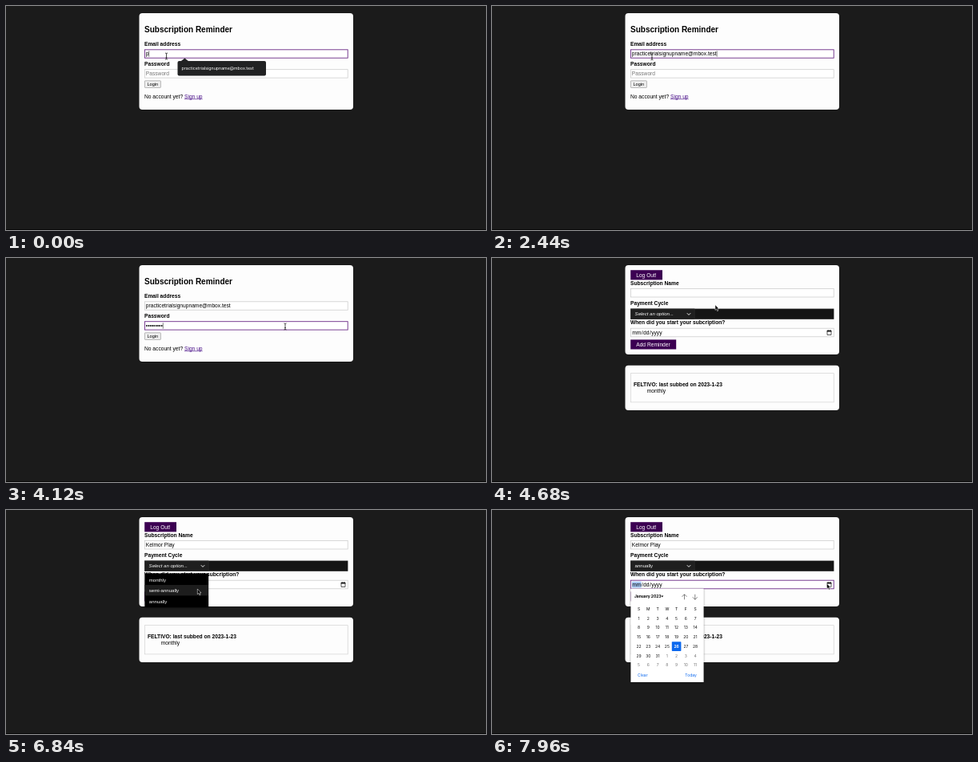
An HTML page that plays this animation: 600x281 px, repeating every 8 s.

```html
<!DOCTYPE html>
<html lang="en">
<head>
<meta charset="utf-8">
<title>Subscription Reminder</title>
<style>
  html, body { margin: 0; width: 100%; height: 100%; overflow: hidden; background: #1b1b1b; }
  svg { display: block; width: 100%; height: 100%; }
  text { font-family: "Liberation Sans", Arial, sans-serif; font-size: 6.67px; white-space: pre; }
  .b { font-weight: bold; }
  .ui { font-family: Inter, Roboto, sans-serif; }
  .opt { font-size: 6.05px; fill: #fff; }
  .cal { font-size: 5px; text-anchor: middle; }
</style>
</head>
<body>
<svg id="stage" viewBox="0 0 600 281"></svg>
<script>
const LOOP = 8000;
const EMAIL = 'practicetrialsignupname@mbox.test';
const USER_LEN = EMAIL.indexOf('@');
const SERVICE = 'Kelmor Play';
const PURPLE = '#3c0052';

const rect = (x, y, w, h, fill, more = '') =>
  `<rect x="${x}" y="${y}" width="${w}" height="${h}" fill="${fill}" ${more}/>`;
const text = (x, y, s, more = '') => `<text x="${x}" y="${y}" ${more}>${s}</text>`;
const bold = (x, y, s) => text(x, y, s, 'class="b"');
const path = (d, stroke, w = .8, fill = 'none') =>
  `<path d="${d}" fill="${fill}" stroke="${stroke}" stroke-width="${w}"/>`;
const group = (id, body, more = '') => `<g id="${id}" ${more}>${body}</g>`;
const card = (y, h) => rect(166.5, y, 267.5, h, '#fdfdfd', 'rx="4"');
const field = (id, y, h = 10.4) =>
  rect(173.4, y, 253.8, h, '#fff', `id="${id}" stroke="#c8c8c8" stroke-width=".7"`);
const button = (x, y, w, h, label) =>
  rect(x, y, w, h, PURPLE) + text(x + 7, y + 8.5, label, 'fill="#fff"');

const login = () =>
  card(9, 121) +
  text(173, 33, 'Subscription Reminder', 'class="b" style="font-size:10px"') +
  bold(173, 50, 'Email address') + field('emailBox', 54.8) + text(174.8, 62.3, '', 'id="email"') +
  bold(173, 74.9, 'Password') + field('passBox', 79.7) + text(174.8, 87.3, '', 'id="pass"') +
  rect(173.4, 93.8, 20, 8.6, '#efefef', 'stroke="#767676" stroke-width=".5" rx=".6"') +
  text(176.5, 100, 'Login', 'style="font-size:5.56px"') +
  text(173, 115.5, 'No account yet?') +
  text(223, 115.5, 'Sign up', 'fill="#4b128a" text-decoration="underline"') +
  group('popup',
    path('M218.3 69.5L223.4 65.5L228.5 69.5Z', 'none', 0, '#212223') +
    rect(214.5, 69, 110.5, 18.5, '#212223', 'rx="2"') +
    text(219.5, 80.1, EMAIL, 'class="ui" fill="#fff" style="font-size:5.3px"'));

const dateField = () =>
  field('dateBox', 88.2, 10.6) +
  rect(175, 89.7, 11.6, 7.8, '#a9caf8', 'id="dateMark"') +
  [[175.2, 'mm'], [186.8, '/'], [189.1, 'dd'], [197, '/'], [199.2, 'yyyy']]
    .map(([x, s]) => text(x, 95.8, s)).join('') +
  path('M419 91.2H424V96.4H419Z M420.2 90V91.2 M422.8 90V91.2', '#111', .7) +
  rect(418.8, 91, 5.4, 1.5, '#111');

const menu = () =>
  rect(173.5, 79.6, 79.5, 42.6, '#000', 'filter="url(#shade)"') +
  rect(173.5, 0, 79.5, 13.4, '#1d1d1d', 'id="hover"') +
  ['monthly', 'semi-annually', 'annually']
    .map((s, i) => text(178.8, 89.8 + i * 13.35, s, 'class="opt"')).join('');

function calendar() {
  const colX = c => 183.6 + c * 11.75;
  let out = rect(173.5, 98.6, 91, 117.4, '#fff', 'filter="url(#shade)"') +
    text(178, 110.2, 'January 2023', 'class="ui b" style="font-size:4.9px"') +
    path('M211.2 107.5H214.4L212.8 109.5Z', 'none', 0, '#111') +
    path('M240.5 112.3V105.8 M237.5 108.8L240.5 105.8L243.5 108.8', '#333', .6) +
    path('M253.8 105.8V112.3 M250.8 109.3L253.8 112.3L256.8 109.3', '#333', .6);
  [...'SMTWTFS'].forEach((s, c) => out += text(colX(c), 125.8, s, 'class="ui cal"'));
  for (let i = 0; i < 42; i++) {
    const x = colX(i % 7), y = 137.7 + Math.floor(i / 7) * 11.75;
    const today = i === 25;
    if (today) out += rect(x - 5.8, y - 7.7, 11.6, 11.7, '#0b68ee', 'rx=".6"');
    const fill = today ? '#fff' : i > 30 ? '#777' : '#111';
    out += text(x, y, i % 31 + 1, `class="ui cal${today ? ' b' : ''}" fill="${fill}"`);
  }
  return out + text(188.3, 209.4, 'Clear', 'class="ui cal" fill="#0b68ee"') +
    text(248.6, 209.4, 'Today', 'class="ui cal" fill="#0b68ee"');
}

const reminders = () =>
  card(9, 112) +
  button(173.2, 15.2, 39.8, 12.2, 'Log Out!') +
  bold(173, 33.5, 'Subscription Name') + field('nameBox', 38.6) + text(174.8, 46.2, '', 'id="name"') +
  bold(173, 58.8, 'Payment Cycle') +
  rect(173.2, 63.6, 254.2, 13.2, '#151515') +
  rect(173.5, 63.9, 79.6, 12.6, '#1f1f1f', 'stroke="#383838" stroke-width=".5"') +
  text(178.6, 72.3, '', 'id="cycle" class="opt"') +
  path('M243.8 69.2L246 71.4L248.2 69.2', '#fff', .9) +
  bold(173, 83.3, 'When did you start your subcription?') +
  dateField() +
  button(173.2, 102.4, 57, 12.1, 'Add Reminder') +
  card(134.7, 56.2) +
  rect(173.4, 144.7, 253.8, 36.2, '#fdfdfd', 'stroke="#ccc" stroke-width=".6"') +
  bold(177, 161.2, 'FELTIVO: last subbed on 2023-1-23') +
  text(193.8, 169, 'monthly') +
  group('menu', menu()) + group('calendar', calendar());

const pointer = () =>
  group('arrow', path('M0 0V6.6L1.5 5.3L2.6 7.8L3.8 7.3L2.7 4.9H4.7Z', '#fff', .5, '#000')) +
  group('beam', path('M-1.5 -4Q0 -4 0 -3V3Q0 4 -1.5 4 M1.5 -4Q0 -4 0 -3 M0 3Q0 4 1.5 4 M-.9 1.5H.9', '#222', .8));

const stage = document.getElementById('stage');
stage.innerHTML =
  `<defs><filter id="shade" x="-20%" y="-20%" width="140%" height="140%">
    <feDropShadow dx="0" dy=".5" stdDeviation="1.2" flood-opacity=".55"/></filter></defs>` +
  rect(0, 0, 600, 281, '#1b1b1b') + rect(0, 280, 600, 1, '#080808') +
  group('login', login()) + group('reminders', reminders()) +
  rect(0, 0, .5, 7.4, '#000', 'id="caret"') + group('pointer', pointer());

const ui = {};
stage.querySelectorAll('[id]').forEach(el => ui[el.id] = el);

const between = (t, a, b) => t >= a && t < b;
const show = (el, on) => el.setAttribute('display', on ? 'inline' : 'none');
const put = (el, s) => { if (el.textContent !== s) el.textContent = s; };
const typed = (t, a, b, n, first = 0) => t < a ? first
  : Math.min(n, first + 1 + Math.floor((t - a) / (b - a) * (n - first - 1)));

// Pointer stops: time, x, y
const STOPS = [
  [0, 200.5, 63], [2400, 200.5, 63], [2760, 186, 81], [3880, 186, 81],
  [4120, 349, 86], [4680, 279, 58.8], [4900, 205, 44], [5800, 205, 44],
  [6040, 269.3, 80], [6280, 245, 71], [6680, 245, 71], [6840, 239.3, 99],
  [7000, 234, 114], [7120, 234, 114], [7480, 331, 93], [7560, 331, 93], [7760, 418.6, 92.3]
];

function pointerAt(t) {
  const i = STOPS.findIndex(s => s[0] > t);
  if (i < 0) return STOPS[STOPS.length - 1].slice(1);
  const [t0, x0, y0] = STOPS[i - 1], [t1, x1, y1] = STOPS[i];
  const p = (t - t0) / (t1 - t0), e = p * p * (3 - 2 * p);
  return [x0 + (x1 - x0) * e, y0 + (y1 - y0) * e];
}

function focus(box, on) {
  box.setAttribute('stroke', on ? '#6b2a86' : '#c8c8c8');
  box.setAttribute('stroke-width', on ? .9 : .7);
}

function draw(t) {
  const second = t >= 4360;
  show(ui.login, !second);
  show(ui.reminders, second);

  const emailOn = t < 2760, passOn = between(t, 2760, 4360);
  const nameOn = between(t, 4940, 6280);
  const filled = t >= 1960;
  put(ui.email, EMAIL.slice(0, filled ? EMAIL.length : typed(t, 120, 1600, USER_LEN, 1)));
  show(ui.popup, t < 2040);
  const dots = typed(t, 3320, 3840, 9);
  put(ui.pass, dots ? '•'.repeat(dots) : 'Password');
  ui.pass.setAttribute('fill', dots ? '#000' : '#757575');
  put(ui.name, SERVICE.slice(0, typed(t, 5040, 5780, SERVICE.length)));

  const chosen = t >= 7040;
  put(ui.cycle, chosen ? 'annually' : 'Select an option...');
  ui.cycle.style.fontStyle = chosen ? 'normal' : 'italic';

  const dateOn = t >= 7760;
  focus(ui.emailBox, emailOn);
  focus(ui.passBox, passOn);
  focus(ui.nameBox, nameOn);
  focus(ui.dateBox, dateOn);
  show(ui.dateMark, dateOn);
  show(ui.calendar, t >= 7800);

  const [x, y] = pointerAt(t);
  show(ui.menu, between(t, 6320, 7040));
  show(ui.hover, y > 79.6);
  const row = Math.max(0, Math.min(2, Math.floor((y - 80.6) / 13.4)));
  ui.hover.setAttribute('y', 80.6 + row * 13.4);

  const active = emailOn ? ui.email : passOn ? ui.pass : nameOn ? ui.name : null;
  show(ui.caret, !!active);
  if (active) {
    const empty = active === ui.pass && !dots || !active.textContent;
    const w = empty ? 0 : active.getComputedTextLength();
    ui.caret.setAttribute('x', 174.9 + w);
    ui.caret.setAttribute('y', +active.getAttribute('y') - 6);
  }

  const hidden = between(t, 120, 2400) || between(t, 3320, 3880) || between(t, 5040, 5800);
  const beam = second ? between(y, 38.6, 49) : between(y, 54.8, 65.2) || between(y, 79.7, 90.1);
  show(ui.pointer, !hidden);
  show(ui.beam, beam);
  show(ui.arrow, !beam);
  ui.pointer.setAttribute('transform', `translate(${x} ${y})`);
}

const start = performance.now();
function tick() {
  draw((performance.now() - start) % LOOP);
  requestAnimationFrame(tick);
}
tick();
</script>
</body>
</html>
```
